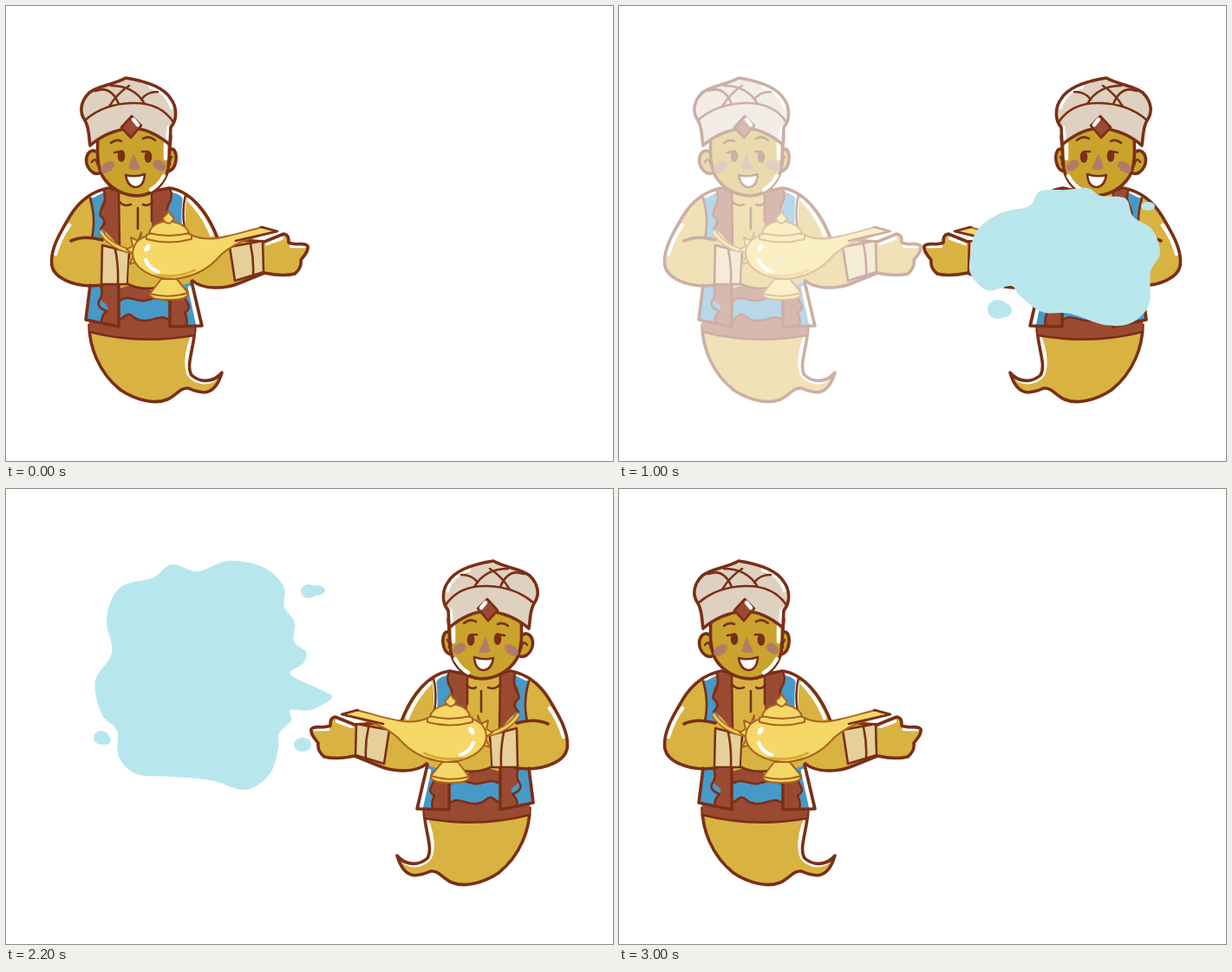
Animation, 700 px wide and 525 px high, one loop 3100 ms. Source, as an HTML page:

```html
<!DOCTYPE html>
<html lang="en">
<head>
<meta charset="utf-8">
<title>Genie</title>
<style>
  html, body { margin: 0; width: 100%; height: 100%; overflow: hidden; background: #fff; }
  svg { display: block; width: 100vw; height: 100vh; }
  .ink { stroke: #7a2f17; stroke-width: 3.6; stroke-linecap: round; stroke-linejoin: round; }
  .fine { stroke-width: 2.6; }
  .none { fill: none; }
  .skin { fill: #d8b342; }
  .face { fill: #caa32c; }
  .cloth { fill: #ded1c0; }
  .trim { fill: #9b4a32; }
  .blue { fill: #4799c8; }
  .cuff { fill: #e6cf98; }
  .shine { fill: none; stroke: #fff; stroke-width: 4.5; stroke-linecap: round; }
  .lamp { fill: #f5d868; stroke: #a8651f; stroke-width: 2; stroke-linejoin: round; }
  .blush { fill: #b27b69; }
  .dark { fill: #7a2f17; }
  .smoke { fill: #b7e7ed; }
</style>
</head>
<body>
<svg viewBox="0 0 700 525">
  <defs>
    <g id="genie">
      <!-- tail and sash -->
      <path class="skin" d="M96 368C96 392 106 422 132 443 150 455 172 460 186 454 197 449 201 440 210 441 222 446 240 454 249 423 238 436 223 434 214 426 207 414 217 396 218 370Z"/>
      <path class="shine" stroke-width="6" d="M214 384C209 398 206 412 211 425 217 434 231 437 240 431"/>
      <path class="ink none" d="M96 368C96 392 106 422 132 443 150 455 172 460 186 454 197 449 201 440 210 441 222 446 240 454 249 423 238 436 223 434 214 426 207 414 217 396 218 370"/>
      <path class="trim" d="M95 358L97 377Q155 391 217 380L218 360Z"/>
      <path class="ink none fine" d="M96 376Q155 391 217 380"/>

      <!-- torso and arms -->
      <path class="skin" d="M118 210C98 214 84 226 74 242 62 262 50 282 53 300 56 314 76 322 97 323L97 345H217L215 317C228 328 252 326 266 321L298 308C312 311 325 311 333 309 338 305 341 300 340 293 344 288 349 283 348 277 344 272 335 277 326 273 326 268 326 264 320 263L298 272 244 268C236 244 222 223 206 216L188 210Z"/>
      <path class="shine" d="M73 253Q62 268 57 286M211 224Q228 241 237 264M246 272L292 267M301 274L318 268M329 277L344 277"/>

      <!-- vest -->
      <path class="blue" d="M97 222Q105 215 115 211V270Q106 268 99 269Q103 245 97 222Z"/>
      <path class="trim" d="M112 212L130 213 131 280Q119 262 109 256Q114 249 110 241T113 224Z"/>
      <path class="blue" d="M186 210Q198 212 207 218Q205 240 208 260L188 250Z"/>
      <path class="trim" d="M167 213L188 210Q193 220 189 227T190 240Q185 247 194 256L168 256Z"/>
      <path class="shine" d="M100 219L112 213M193 213Q203 215 206 222 204 236 205 253"/>
      <path class="ink none fine" d="M97 222Q104 245 99 268M113 213Q116 225 111 233T111 244Q117 250 109 257M130 214L131 278M168 214V248M189 211Q193 220 188 228T189 240Q184 247 193 254M207 218Q202 238 207 262M131 226Q136 232 144 229M158 229Q164 232 169 226M152 233V257"/>
      <path class="trim" d="M128 323H192V368H128Z"/>
      <path class="skin" d="M131 318H190V326Q176 334 164 326T131 326Z"/>
      <path class="blue" d="M131 340C142 332 150 342 160 340S178 332 190 342V364C182 356 176 360 168 362S152 364 146 358 136 360 131 364Z"/>
      <path class="ink none fine" d="M131 340C142 332 150 342 160 340S178 332 190 342M190 364C182 356 176 360 168 362S152 364 146 358 136 360 131 362"/>
      <path class="blue" d="M97 321H131V370L92 362Z"/>
      <path class="trim" d="M109 321H131V370L110 366Q111 358 116 352T108 339Q113 330 109 321Z"/>
      <path class="ink none fine" d="M109 323Q113 331 108 339T116 352Q110 357 110 366"/>
      <path class="blue" d="M189 326L214 319 226 369H189Z"/>
      <path class="trim" d="M189 326H209Q204 334 209 341T206 354Q211 361 208 370H189Z"/>
      <path class="shine" d="M212 325L221 366"/>
      <path class="ink none fine" d="M209 330Q204 335 209 342T206 354Q210 361 208 369"/>
      <path class="ink none" d="M97 322L92 362 130 370V322M189 338V370L226 369 214 318"/>

      <!-- arm lines and cuffs -->
      <path class="ink none" d="M118 210C98 214 84 226 74 242 62 262 50 282 53 300 56 314 76 322 97 323L112 322M75 271Q90 264 111 270M188 210C214 213 234 241 244 268L298 272 320 263C326 264 326 268 326 273 335 277 344 272 348 277 349 283 344 288 340 293 341 300 338 305 333 309 325 311 312 311 298 308L266 321C252 326 228 328 215 317M118 210Q150 219 188 210"/>
      <path class="cuff" d="M111 276L142 284 140 321 110 321ZM258 278L296 271 297 307 264 317Z"/>
      <path class="ink none fine" d="M111 276L142 284 140 321 110 321ZM126 281Q130 300 129 321M258 278L296 271 297 307 264 317ZM282 275Q286 293 285 310"/>
      <path class="skin" d="M142 292Q150 300 162 306L181 315 178 326Q158 328 141 320Z"/>
      <path class="ink none fine" d="M141 321Q155 328 172 325"/>

      <!-- head -->
      <path class="face ink" d="M107 170C98 162 91 171 93 182 96 191 103 196 110 192ZM187 168C193 160 197 169 196 178 195 186 191 191 185 191Z"/>
      <path class="ink none fine" d="M99 180Q104 173 106 184M191 174Q188 178 189 183"/>
      <path class="face ink" d="M106 150C105 168 105 184 111 196 120 211 136 219 152 219 171 218 184 204 187 188L190 150Q148 124 106 150Z"/>
      <path class="shine" d="M184 158V176M182 196Q176 207 167 212" stroke-width="3"/>
      <path class="ink none fine" d="M121 158Q127 153 133 156M158 153Q165 149 172 155"/>
      <ellipse class="dark" cx="133" cy="173" rx="4.3" ry="7"/>
      <ellipse class="dark" cx="164" cy="174" rx="4.3" ry="7"/>
      <path class="ink none fine" stroke-width="2" d="M125 169L131 168M157 168L163 168"/>
      <path class="blush" d="M147 170L155 188Q148 191 141 187Z"/>
      <ellipse class="blush" cx="117" cy="186" rx="9" ry="5.5" transform="rotate(-38 117 186)"/>
      <ellipse class="blush" cx="177" cy="184" rx="8" ry="5.5" transform="rotate(38 177 184)"/>
      <path class="ink fine" fill="#fff" d="M138 195Q149 198 160 194Q159 209 149 209 140 208 138 195Z"/>

      <!-- turban -->
      <path class="cloth" d="M97 161C95 148 96 140 91 132 84 122 86 110 96 100 106 92 124 91 138 83 157 86 181 92 190 107 197 116 198 131 190 140L189 160Q165 140 143 141 116 144 97 161Z"/>
      <path class="shine" d="M166 93Q186 99 191 117M188 140L186 154"/>
      <path class="ink none" d="M97 161C95 148 96 140 91 132 84 122 86 110 96 100 106 92 124 91 138 83 157 86 181 92 190 107 197 116 198 131 190 140L189 160Q165 140 143 141 116 144 97 161Z"/>
      <path class="ink none fine" d="M91 132Q112 113 145 112T193 134M103 98Q121 91 130 113M119 116Q128 101 142 92M121 92Q148 92 160 113M156 108Q162 99 175 99"/>
      <path class="trim ink fine" d="M145 127L156 138 144 152 133 140Z"/>
      <path class="shine" stroke-width="3" d="M147 131L152 137"/>

      <!-- lamp -->
      <path class="none" stroke="#a8651f" stroke-width="6" d="M109 260Q121 279 148 284"/>
      <path class="none" stroke="#f0cb58" stroke-width="3" d="M109 260Q121 279 148 284"/>
      <path class="lamp" d="M156 261L152 271 144 267 146 277 139 281 148 287 142 298 154 294Z"/>
      <path class="lamp" d="M179 315H197L210 331Q211 339 188 339T166 332Z"/>
      <path class="lamp" d="M166 332Q188 338 210 331"/>
      <path class="lamp" d="M146 285C147 271 157 265 172 264H213C235 274 253 266 296 255L313 260C286 267 267 270 248 287 235 302 220 312 194 315 167 315 146 302 146 285Z"/>
      <path class="ink none fine" d="M294 255L313 260Q286 266 265 271"/>
      <path class="none" stroke="#dba936" stroke-width="3" d="M173 310Q198 315 219 304"/>
      <path class="lamp" d="M162 264Q188 255 214 264V269Q188 276 162 269Z"/>
      <path class="lamp" d="M165 262Q168 250 186 248 207 250 211 262Q188 268 165 262Z"/>
      <path class="lamp" d="M187 236Q189 241 194 245 190 251 187 251 181 249 181 244 186 241 187 236Z"/>
      <ellipse cx="163" cy="279" rx="3" ry="5" fill="#fff" transform="rotate(30 163 279)"/>
      <path class="shine" d="M161 293Q165 303 176 307"/>
    </g>
  </defs>
  <use id="left" href="#genie"/>
  <use id="right" href="#genie" transform="matrix(-1 0 0 1 700 0)"/>
  <g id="side"><g id="cloud" class="smoke"></g></g>
</svg>
<script>
  const $ = id => document.getElementById(id);
  const TICK = 100, TICKS = 31, HALF = 13;

  // Each cloud has a center, an outline and loose drops (x, y, rx, ry).
  const clouds = {
    burst: {
      c: [500, 211],
      pts: [360,237, 372,228, 408,210, 393,197, 390,184, 404,172, 403,150, 415,132, 416,108,
        440,86, 480,79, 515,91, 545,83, 566,98, 605,110, 620,145, 614,185, 633,217, 626,255,
        608,275, 606,305, 585,325, 545,328, 500,332, 460,343, 432,325, 422,295, 421,278,
        407,263, 408,251, 385,251],
      drops: [[378,113,10,6], [387,114,9,8], [394,291,10,8], [626,283,9,8], [620,286,5,5]]
    },
    puff: {
      c: [509, 241], rim: true,
      pts: [639,200, 630,180, 625,158, 610,135, 570,122, 520,128, 485,126, 450,145, 440,159,
        402,178, 397,200, 411,225, 388,240, 380,270, 390,305, 425,317, 435,335, 470,343,
        490,358, 540,352, 570,352, 600,330, 603,312, 622,290, 628,265, 620,235, 635,220],
      drops: [[377,212,11,13], [367,212,7,6], [624,318,12,7], [635,238,5,6]]
    },
    wisp: {
      c: [515, 290], rim: true,
      pts: [405,290, 412,260, 440,239, 473,231, 485,214, 515,212, 540,210, 556,219, 584,222,
        593,243, 615,258, 624,285, 613,307, 611,345, 590,366, 560,368, 520,355, 488,353,
        462,334, 452,323, 425,328, 406,310],
      drops: [[437,350,12,11], [445,351,8,8], [610,231,8,5]]
    }
  };

  // Shape, center x, center y, scale x, scale y for every tick of smoke.
  const poses = [
    ['burst', 322, 258, .14, .14], ['burst', 370, 249, .36, .36], ['burst', 424, 235, .62, .62],
    ['burst', 473, 220, .86, .86], ['burst', 500, 211, 1, 1], ['burst', 504, 218, 1, 1.04],
    ['puff', 509, 204, 1.03, 1.1], ['puff', 509, 241, 1, 1], ['wisp', 512, 267, 1.09, 1.25],
    ['wisp', 515, 290, 1, 1], ['wisp', 511, 314, .68, .66], ['wisp', 500, 334, .36, .34]
  ];

  // Closed Catmull-Rom curve through the points.
  function smooth(flat) {
    const n = flat.length / 2;
    const at = i => { const j = (i + n) % n * 2; return [flat[j], flat[j + 1]]; };
    let d = 'M' + at(0);
    for (let i = 0; i < n; i++) {
      const [a, b, c, e] = [at(i - 1), at(i), at(i + 1), at(i + 2)];
      const out = b.map((v, k) => v + (c[k] - a[k]) / 6);
      const into = c.map((v, k) => v - (e[k] - b[k]) / 6);
      d += `C${out} ${into} ${c}`;
    }
    return d + 'Z';
  }

  const markup = {};
  for (const [name, { c, pts, drops, rim }] of Object.entries(clouds)) {
    const d = smooth(pts);
    const inner = rim ? `<path d="${d}" transform="translate(${c}) scale(.955) translate(${-c[0]} ${-c[1]})"
      fill="none" stroke="#d5dde3" stroke-width="1.2" stroke-dasharray="9 4 2 5"/>` : '';
    markup[name] = `<path d="${d}"/>${inner}` +
      drops.map(([x, y, rx, ry]) => `<ellipse cx="${x}" cy="${y}" rx="${rx}" ry="${ry}"/>`).join('');
  }

  let shown = -1;
  function draw(tick) {
    if (tick === shown) return;
    shown = tick;
    const back = tick >= HALF;
    const k = back ? tick - 17 : tick;
    const [from, to] = back ? [$('right'), $('left')] : [$('left'), $('right')];
    from.setAttribute('opacity', k <= 6 ? 1 : k > 12 ? 0 : 1 - (k - 6) * .155);
    to.setAttribute('opacity', k > 6 ? 1 : 0);
    $('side').setAttribute('transform', back ? 'matrix(-1 0 0 1 700 0)' : '');
    const pose = poses[k - 1];
    if (!pose) { $('cloud').innerHTML = ''; return; }
    const [name, x, y, sx, sy] = pose;
    const [cx, cy] = clouds[name].c;
    const drift = back && name === 'burst' ? [-36 * sx, 4] : [0, 0];
    $('cloud').innerHTML = markup[name];
    $('cloud').setAttribute('transform',
      `translate(${x + drift[0]} ${y + drift[1]}) scale(${sx} ${sy}) translate(${-cx} ${-cy})`);
  }

  const start = performance.now();
  function loop(now) {
    draw(Math.floor(Math.max(0, now - start) / TICK) % TICKS);
    requestAnimationFrame(loop);
  }
  draw(0);
  requestAnimationFrame(loop);
</script>
</body>
</html>
```
